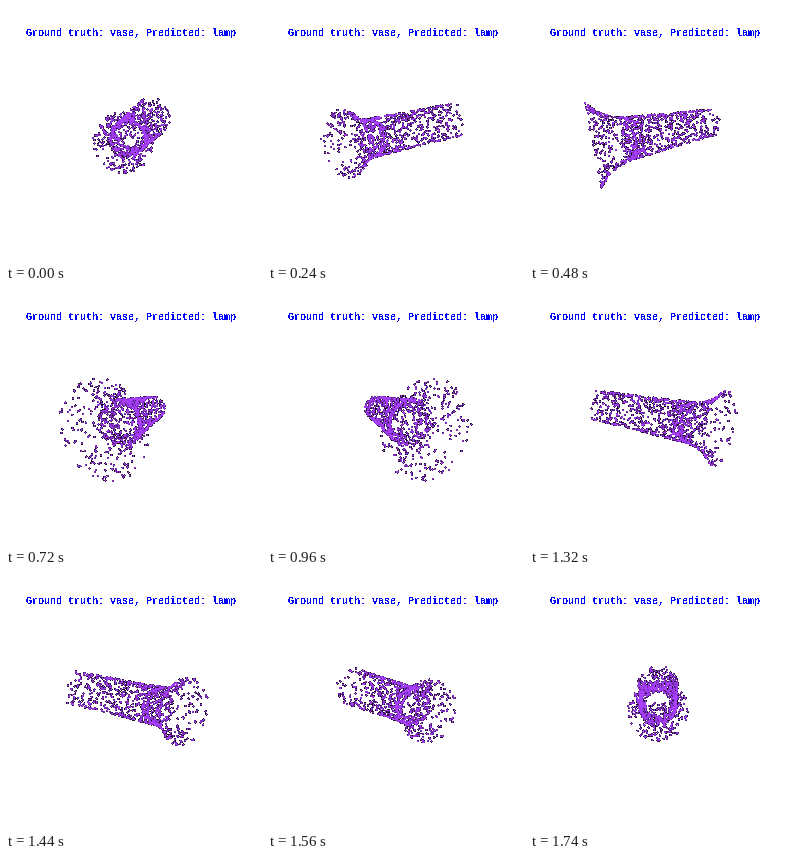
A matplotlib script for the animation above (1.8 s loop, 256 px wide and 256 px high).

```python
import matplotlib.pyplot as plt
import numpy as np
from matplotlib.animation import FuncAnimation

SIZE, DPI = 256, 100
FRAMES, INTERVAL = 30, 60
FOCAL = SIZE / 2 / np.tan(np.radians(30))  # 60 degree field of view, camera at distance 1
TILT = np.radians(10.5)
DOT = 1.28
PURPLE = np.array([170, 64, 255]) / 255

rng = np.random.default_rng(7)


def revolve(profile, count):
    """Sample a surface of revolution evenly by area; rows are (axial, side, up)."""
    z, r = np.array(profile).T
    s = np.linspace(0, len(z) - 1, 600)
    z, r = (np.interp(s, np.arange(len(z)), v) for v in (z, r))
    area = np.hypot(np.diff(z), np.diff(r)) * (r[1:] + r[:-1]) / 2
    cdf = np.concatenate([[0], np.cumsum(area)]) / area.sum()
    u = rng.random(count)
    z, r = np.interp(u, cdf, z), np.interp(u, cdf, r)
    a = rng.uniform(0, 2 * np.pi, count)
    return np.column_stack([z, r * np.cos(a), r * np.sin(a)])


def make_vase():
    tube = revolve([(-.288, .064), (-.06, .078), (.157, .096)], 560)
    flare = revolve([(.157, .096), (.2, .108), (.25, .136), (.286, .176)], 270)
    collar = revolve([(.15, .096), (.08, .06)], 194)
    z, side, up = np.vstack([tube, flare, collar]).T
    c, s = np.cos(TILT), np.sin(TILT)
    return z * c + up * s, side, .006 - z * s + up * c


AXIAL, SIDE, UP = make_vase()


def project(k):
    b = 2 * np.pi * (k + 1) / FRAMES
    x = SIDE * np.cos(b) - AXIAL * np.sin(b)
    depth = 1 + AXIAL * np.cos(b) + SIDE * np.sin(b)
    return SIZE / 2 + FOCAL * x / depth, SIZE / 2 - FOCAL * UP / depth


def render(k):
    """Soft dots composited over black, with untouched pixels left white."""
    x, y = project(k)
    px, py = np.floor(x).astype(int), np.floor(y).astype(int)
    clear = np.ones((SIZE, SIZE))
    for dy in range(-2, 3):
        for dx in range(-2, 3):
            d2 = (px + dx + .5 - x) ** 2 + (py + dy + .5 - y) ** 2
            alpha = np.clip(1 - d2 / DOT ** 2, 0, 1)
            np.multiply.at(clear, (py + dy, px + dx), 1 - alpha)
    image = (1 - clear)[..., None] * PURPLE
    image[clear == 1] = 1
    return image


plt.rcParams["text.antialiased"] = False
fig = plt.figure(figsize=(SIZE / DPI, SIZE / DPI), dpi=DPI, facecolor="white")
cloud = fig.figimage(render(0), origin="upper")
fig.text(20 / SIZE, 1 - 30 / SIZE, "Ground truth: vase, Predicted: lamp",
         family="Liberation Mono", weight="bold", size=10 * 72 / DPI,
         color="blue", va="baseline", zorder=3)


def update(k):
    cloud.set_data(render(k))
    return [cloud]


anim = FuncAnimation(fig, update, frames=FRAMES, interval=INTERVAL,
                     repeat=True, repeat_delay=0, blit=False)
plt.show()
```
